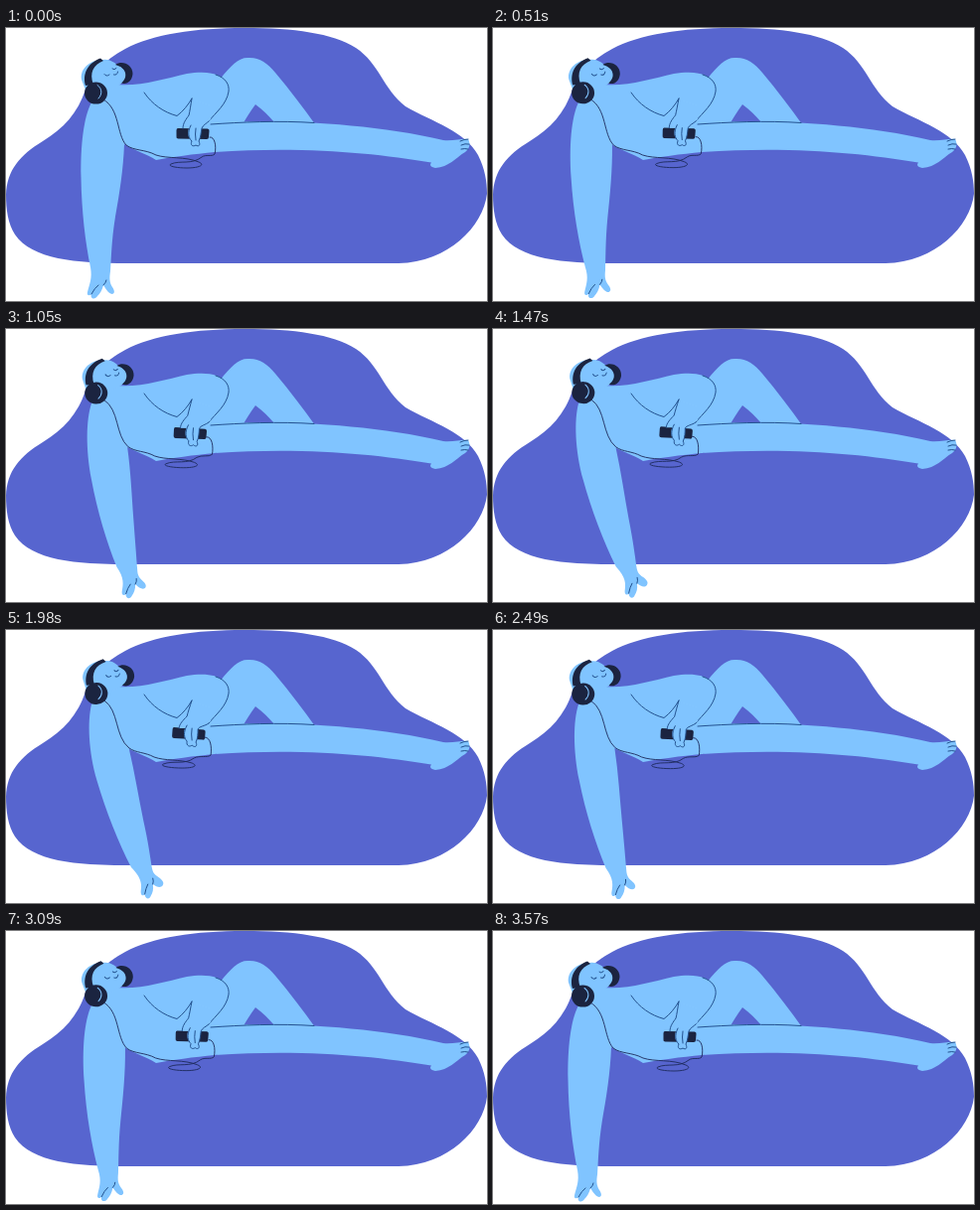
Animation, 484 px wide and 275 px high, one loop 3.6 s. Source, as an HTML page:

```html
<!DOCTYPE html>
<html lang="en">
<head>
<meta charset="utf-8">
<title>Listening to music</title>
<style>
html, body { margin: 0; width: 100%; height: 100%; overflow: hidden; background: #fff; }
svg { display: block; width: 100vw; height: 100vh; }
.skin { fill: #80c4ff; }
.dark { fill: #1b2440; }
.line, .cord { fill: none; stroke-linecap: round; stroke-linejoin: round; }
.line { stroke: #23528f; stroke-width: 1; }
.cord { stroke: #1e2b5c; stroke-width: .9; }
</style>
</head>
<body>
<svg viewBox="0 0 484 275">
  <path fill="#5765cf" d="M0 168C1 143 14 128 37 114C58 101 72 86 80 62C86 46 98 33 120 21C148 6 190 0 240 0C290 0 328 5 352 20C376 36 379 61 402 79C430 95 462 104 475 128C482 142 484 155 484 167C480 200 445 236 395 237H122C70 237 26 233 9 208C2 197 0 183 0 168Z"/>
  <path class="skin" d="M205 97L215 52C226 38 234 30 243 30C254 29 263 35 271 45C286 63 299 80 311 97L270 95C264 88 258 82 251 77C246 84 242 90 238 97Z"/>
  <path class="skin" d="M86 76C92 64 102 60 112 57C135 59 160 51 182 46C205 42 221 47 224 59C226 72 212 82 206 96C260 92 360 94 440 113C450 114 460 111 465 112C468 117 466 122 462 125C452 131 446 140 432 141C427 140 426 138 428 135.500C370 126 300 119 210 125C190 127 165 130 151 133C140 126 130 124 119 117L95 105Z"/>
  <g class="line">
    <path d="M206 97C235 95 275 93 310 95.500"/>
    <path d="M139 65C147 77 159 85 172 88.500C178 84 183 78 187 71"/>
    <path d="M211 47C221 50 225 57 224 64C222 77 211 85 204 94"/>
    <path d="M465 112Q461 112 457 114M466 117Q462 116 458 118M465 122Q462 121 458 122"/>
  </g>
  <g id="moving"></g>
  <g id="head">
    <path class="skin" d="M76 52C74 41 85 31.500 98 32C104 31 109 35 112 37C121 40 124 50 117 55.500C109 61 103 62 101 68L84 73Z"/>
    <path class="dark" d="M110 37C117 32 127.500 37 127.500 46C127 53 122 57.500 116 55.500C123 50 122 40 110 37Z"/>
    <path class="dark" d="M80 58C77 47 81 36 95 30.500L98 33C88 37 83.500 45 88 57Z"/>
    <ellipse class="dark" cx="90.500" cy="65.600" rx="11.500" ry="11"/>
    <path class="line" style="stroke:#80c4ff" d="M92 57.500C97 61 97 67 93 71"/>
    <path class="line" d="M99 46.500Q101 49.500 104 47M107 41Q109 43 111 40.500M108.500 47Q112 48 112.500 44"/>
  </g>
</svg>
<script>
const LOOP = 3600;
const SVG = 'http://www.w3.org/2000/svg';
const root = document.getElementById('moving');
const head = document.getElementById('head');

// class, rest pose, swung pose
const parts = [
  ['skin',
   'M100 70L86 75C78 90 75 118 75.500 150C76 185 80 217 85 241C87 252 84 258 82 266C81 270 84 270 86 268C84 273 90 274 92 270C94 268 97 264 98 259C101 264 104 268 107 268C110 267 109 264 107 261C104 256 104 252 105 245C106 232 106 215 110 190C114 168 118 143 119 117Z',
   'M100 70L86 75C82 92 83 122 92 152C101 182 114 214 127 239C138 250 138 256 137 264C137 268 140 268 141 266C141 271 146 272 147 268C149 265 150 261 149 256C153 259 157 260 159 257C161 254 158 251 155 249C150 246 149 244 148 240C146 228 144 213 139 192C134 169 130 145 124 120Z'],
  ['line',
   'M86 268Q89 262 93 259M98 259Q101 256 101 254',
   'M141 266Q142 260 144 256M149 256Q150 253 149 250'],
  ['dark',
   'M173 101L203 101.500Q205 102 204.500 104L204 110Q204 112 202 112L173 111.500Q171 111 171.500 109L171.500 103Q171.500 101 173 101Z',
   'M169 98L199 100.500Q201 101 200.500 103L200 109Q199.500 111 198 110.500L169 109Q167 109 167 107L167.500 100Q167.500 98 169 98Z'],
  ['skin',
   'M187 72L184 88C181 92 178 96 178 101L184 101C182 107 184 111 187 114C185 118 188 120 191 118C194 120 196 118 194 114C196 110 196 106 197 101L206 92L205 78Z',
   'M187 72L182 87C178 91 174 95 174 99L180 99C178 104 179 109 182 112C181 117 185 118 187 116C190 119 193 117 191 113C193 109 193 104 193 100L206 92L205 78Z'],
  ['line',
   'M187 71C186 77 185 84 184 88C181 92 178 96 178 101M186 98C182 106 184 111 187 114C185 118 188 120 191 118C194 120 196 118 194 114C196 110 196 106 197 101C198 98 202 96 204 94M191 101Q190 107 191 113',
   'M187 71C185 77 183 83 182 87C178 91 174 95 174 99M182 96C178 103 179 109 182 112C181 117 185 118 187 116C190 119 193 117 191 113C193 109 193 104 193 100C194 97 200 97 204 94M187 99Q186 105 187 111'],
  ['cord',
   'M98 72C115 82 111 107 121 118C129 124 140 122 151 128C163 132 180 129 194 135C201 138 194 141 182 141C171 141 162 139 166 137C175 133 187 138 197 130C201 127 207 130 210 127C212 119 210 109 205 110',
   'M99 71C114 81 109 107 124 119C131 124 140 123 149 128C160 132 174 130 187 134C194 137 188 139 177 139C165 139 154 137 158 135C168 131 180 136 189 129C195 126 202 129 206 126C207 118 206 108 200 108']
].map(([cls, rest, swung]) => {
  const el = document.createElementNS(SVG, 'path');
  el.setAttribute('class', cls);
  root.append(el);
  return { el, rest, ends: swung.match(/[\d.]+/g).map(Number) };
});

function blend({ el, rest, ends }, p) {
  let i = 0;
  el.setAttribute('d', rest.replace(/[\d.]+/g, n => (+n + (ends[i++] - n) * p).toFixed(2)));
}

function draw() {
  const t = performance.now() % LOOP;
  const p = (1 - Math.cos(2 * Math.PI * t / LOOP)) / 2;
  parts.forEach(part => blend(part, p));
  head.setAttribute('transform', `translate(${0.4 * p} ${-1.6 * p}) rotate(${4 * p} 90.5 65.3)`);
  requestAnimationFrame(draw);
}
draw();
</script>
</body>
</html>
```
